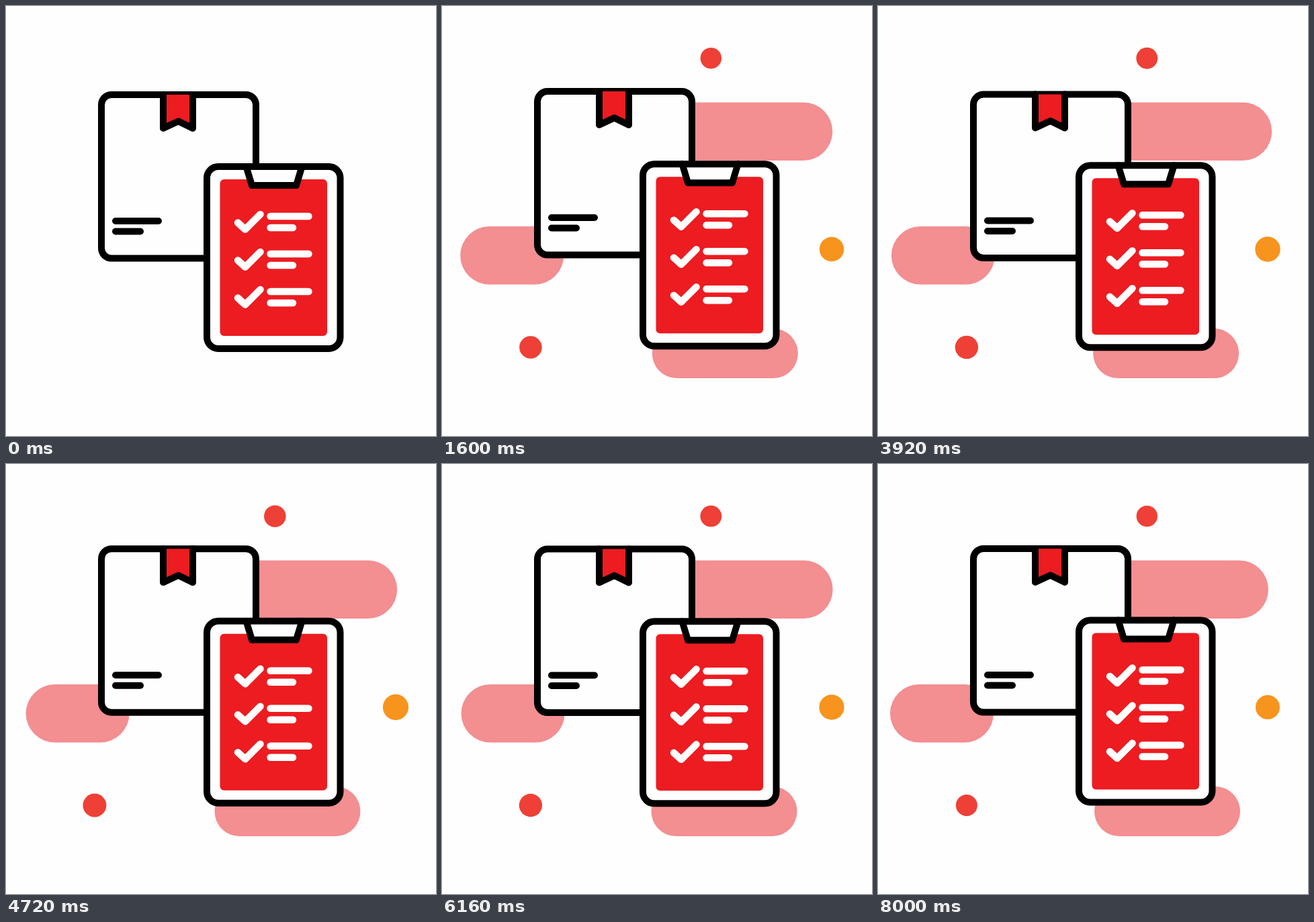
These frames come from a looping animation (640x640 px, 8.08 s). An HTML page:

```html
<!DOCTYPE html>
<html lang="en">
<head>
<meta charset="utf-8">
<title>Parcel checklist</title>
<style>
  html, body { margin: 0; width: 100%; height: 100%; overflow: hidden; background: #fefefe; }
  svg { display: block; width: 100%; height: 100%; }
  .pill { fill: #f38e91; }
  .dot { fill: #ee4036; }
  .paper { fill: #fefefe; }
  .red { fill: #ec1c21; }
  .ink { stroke: #000; stroke-width: 10; stroke-linecap: round; stroke-linejoin: round; }
  .chalk { fill: none; stroke: #fefefe; stroke-width: 10.5; stroke-linecap: round; stroke-linejoin: round; }
  .none { fill: none; }
</style>
</head>
<body>
<svg viewBox="0 0 640 640">
  <defs>
    <path id="row" class="chalk" d="M345 316 L356 326 L378.5 303.5 M393.5 306.5 H450.5 M393.5 323.5 H427"/>
  </defs>

  <g id="backdrop">
    <rect id="leftPill" class="pill" x="18" y="328" width="154" height="86.5" rx="43.25"/>
    <rect id="rightPill" class="pill" x="330" y="143.5" width="251" height="86.5" rx="43.25"/>
    <rect id="lowPill" class="pill" x="322" y="480" width="217" height="74" rx="37"/>
    <circle id="topDot" class="dot" cx="400.3" cy="77.7"/>
    <circle id="lowDot" class="dot" cx="131.9" cy="508"/>
    <circle id="orangeDot" fill="#f7941d" cx="580" cy="362"/>
  </g>

  <g id="parcel">
    <rect class="paper ink" x="142" y="126" width="230" height="243.5" rx="15"/>
    <path class="red ink" d="M234 126 V176 L256.5 165.5 L278 176 V126"/>
    <path class="ink none" d="M163 314 H227 M163 329.5 H200"/>
  </g>

  <g id="board">
    <rect class="paper" x="299" y="232.5" width="198.5" height="271" rx="17"/>
    <rect class="red" x="318.5" y="251.5" width="159.5" height="233" rx="6"/>
    <path class="paper ink" d="M357.5 232.5 L366 260.5 H432 L440.5 232.5"/>
    <rect class="ink none" x="299" y="232.5" width="198.5" height="271" rx="17"/>
    <use href="#row"/>
    <use href="#row" y="56"/>
    <use href="#row" y="112"/>
  </g>
</svg>
<script>
  const LOOP = 8080, STEP = 80, ENTER = 900, SWAY = 1500, PULSE = 750;
  const el = id => document.getElementById(id);
  const clamp = (v, lo, hi) => Math.min(hi, Math.max(lo, v));
  const move = (id, x, y) => el(id).setAttribute('transform', `translate(${x} ${y})`);

  // Swings 0 -> 1 -> 0 for a number of cycles, then rests.
  const wave = (t, start, period, cycles) =>
    (1 - Math.cos(2 * Math.PI * clamp((t - start) / period, 0, cycles))) / 2;

  const progress = (t, end) => clamp((t - ENTER) / (end - ENTER), 0, 1);
  const remaining = (t, end) => (1 - progress(t, end)) ** 3;

  function popOut(p) {
    const s = 3.2, q = p - 1;
    return 1 + (s + 1) * q ** 3 + s * q * q;
  }

  function dot(id, t, start, radius, growth) {
    const r = radius * popOut(progress(t, start)) + growth * wave(t, start, PULSE, 8);
    el(id).setAttribute('r', Math.max(0, r));
  }

  function draw(t) {
    el('backdrop').setAttribute('visibility', t > ENTER ? 'visible' : 'hidden');

    const sway = 12.6 * wave(t, 1109, SWAY, 4);
    const late = remaining(t, 1109);
    move('leftPill', sway + 125 * late, 0);
    move('lowPill', -sway, -70 * late);
    move('rightPill', 6 * wave(t, 1500, SWAY, 4) - 210 * remaining(t, 1500), 0);

    dot('topDot', t, 1583, 15.7, 1.8);
    dot('lowDot', t, 1417, 16, 1.6);
    dot('orangeDot', t, 1521, 18, 2.1);

    move('parcel', 0, 6 * (1 - wave(t, 1054, SWAY, 4.5)));
    move('board', 0, 6.5 * (1 - wave(t, 1180, SWAY, 4.5)));
  }

  const begin = performance.now();
  function tick() {
    const t = (performance.now() - begin) % LOOP;
    draw(Math.floor(t / STEP) * STEP);
    requestAnimationFrame(tick);
  }
  tick();
</script>
</body>
</html>
```
